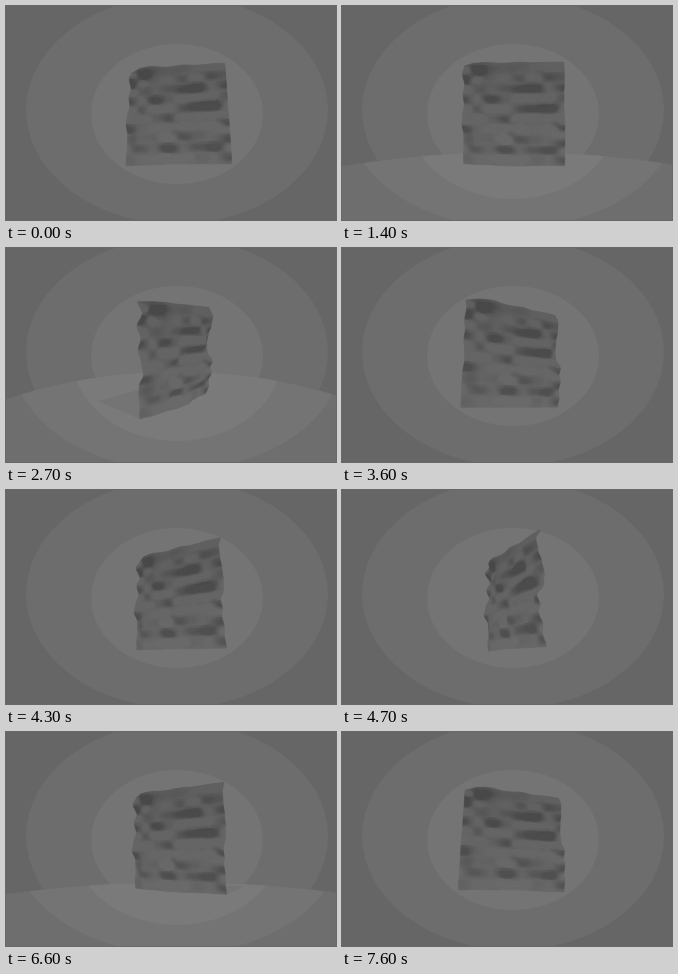
These frames come from a looping animation (330 px wide and 214 px high, 9.9 s). An HTML page with a canvas:

```html
<!DOCTYPE html>
<html lang="en">
<head>
<meta charset="utf-8">
<title>Rippled sheet</title>
<style>
  html, body { margin: 0; width: 100%; height: 100%; overflow: hidden; background: #666; }
  canvas { display: block; width: 100vw; height: 100vh; }
</style>
</head>
<body>
<canvas id="stage" width="330" height="214"></canvas>
<script>
const ctx = document.getElementById('stage').getContext('2d');
const W = 330, H = 214, CX = 171, CY = 108;
const LOOP = 9900, STEPS = 37;
const DIST = 2.35, FOCAL = 235;
const FLOOR_Y = -0.62, FLOOR_R = 2.2, FLOOR_MIN_TILT = -9;
const CELLS = 56, COLS = 7, ROWS = 10;

// the camera swings through these poses
const POSES = [
  { t: 0, yaw: 11, tilt: -18 },
  { t: 1400, yaw: 7, tilt: -3 },
  { t: 2700, yaw: -48, tilt: 8 },
  { t: 3600, yaw: -24, tilt: -12 },
  { t: 4700, yaw: 58, tilt: -15 },
  { t: 5700, yaw: 62, tilt: 6 },
  { t: 7600, yaw: -11, tilt: -18 }
];

const grey = level => {
  const g = Math.round(level);
  return `rgb(${g},${g},${g})`;
};
const clamp = (x, low, high) => Math.max(low, Math.min(high, x));
const smooth = x => x * x * (3 - 2 * x);
const mix = (a, b, p) => a + (b - a) * p;
const bell = (x, y) => Math.exp(-x * x - y * y);

function random(i, j) {
  const n = Math.sin(i * 127.1 + j * 311.7) * 43758.5453;
  return n - Math.floor(n);
}

function noise(x, y) {
  const i = Math.floor(x), j = Math.floor(y);
  const p = smooth(x - i), q = smooth(y - j);
  return mix(mix(random(i, j), random(i + 1, j), p),
             mix(random(i, j + 1), random(i + 1, j + 1), p), q);
}

// random ripples, a raised top left corner and a bulge on the right edge
function sheetHeight(u, v) {
  return .09 * noise(u * COLS, v * ROWS)
    + .07 * bell((u - .16) / .14, v / .08)
    + .06 * bell((u - 1) / .1, (v - .73) / .07);
}

function shade(u, v) {
  const d = .008;
  const hx = (sheetHeight(u + d, v) - sheetHeight(u - d, v)) / (2 * d);
  const hy = (sheetHeight(u, v - d) - sheetHeight(u, v + d)) / (2 * d);
  const light = (.78 - .1 * hx - .6 * hy) / Math.hypot(hx, hy, 1);
  return 60 + 56 * clamp(light, .38, .83) - 10 * (1 - v);
}

const vertices = [], faces = [];
for (let j = 0; j <= CELLS; j++)
  for (let i = 0; i <= CELLS; i++) {
    const u = i / CELLS, v = j / CELLS;
    vertices.push([u - .5, .5 - v, sheetHeight(u, v)]);
    if (i < CELLS && j < CELLS) {
      const a = j * (CELLS + 1) + i;
      faces.push({
        corners: [a, a + 1, a + CELLS + 2, a + CELLS + 1],
        color: grey(shade((i + .5) / CELLS, (j + .5) / CELLS))
      });
    }
  }

function poseAt(t) {
  const last = POSES[POSES.length - 1];
  if (t < POSES[1].t) return POSES[0];
  if (t >= last.t) return last;
  const i = POSES.findIndex(pose => pose.t > t);
  const a = POSES[i - 1], b = POSES[i];
  const p = smooth((t - a.t) / (b.t - a.t));
  return { yaw: mix(a.yaw, b.yaw, p), tilt: mix(a.tilt, b.tilt, p) };
}

function camera(yaw, tilt) {
  const [c, s, ct, st] = [yaw, tilt].flatMap(degrees => {
    const angle = degrees * Math.PI / 180;
    return [Math.cos(angle), Math.sin(angle)];
  });
  return ([x, y, z]) => {
    const depth = x * s + z * c;
    const near = y * st + depth * ct;
    const scale = FOCAL / (DIST - near);
    return [CX + (x * c - z * s) * scale, CY - (y * ct - depth * st) * scale, near];
  };
}

function trace(points) {
  ctx.beginPath();
  points.forEach(([x, y]) => ctx.lineTo(x, y));
  ctx.closePath();
}

function ellipse(y, rx, ry, level) {
  ctx.fillStyle = grey(level);
  ctx.beginPath();
  ctx.ellipse(CX, y, rx, ry, 0, 0, Math.PI * 2);
  ctx.fill();
}

function drawRoom() {
  ctx.fillStyle = grey(102);
  ctx.fillRect(0, 0, W, H);
  ellipse(104, 151, 114, 109);
  ellipse(CY, 86, 70, 116);
}

function drawFloor({ yaw, tilt }) {
  if (tilt < FLOOR_MIN_TILT) return;
  const view = camera(0, tilt), rim = [];
  for (let a = 0; a < 180; a++) {
    const angle = a * Math.PI / 90;
    rim.push(view([FLOOR_R * Math.sin(angle), FLOOR_Y, FLOOR_R * Math.cos(angle)]));
  }
  ctx.save();
  trace(rim);
  ctx.clip();
  ctx.fillStyle = grey(110);
  ctx.fillRect(0, 0, W, H);
  ellipse(CY, 165, 114, 116);
  ellipse(CY, 105, 85, 122);
  const shadow = [[-.5, 0], [.5, 0], [.5, -.7], [-.5, -.7]];
  trace(shadow.map(([x, z]) => camera(yaw, tilt)([x, -.5, z])));
  ctx.fillStyle = 'rgba(0,0,0,.05)';
  ctx.fill();
  ctx.restore();
}

function drawSheet({ yaw, tilt }) {
  const points = vertices.map(camera(yaw, tilt));
  const depth = face => points[face.corners[0]][2] + points[face.corners[2]][2];
  ctx.lineWidth = .6;
  for (const face of [...faces].sort((a, b) => depth(a) - depth(b))) {
    trace(face.corners.map(n => points[n]));
    ctx.fillStyle = ctx.strokeStyle = face.color;
    ctx.fill();
    ctx.stroke();
  }
}

// the picture advances in coarse, slightly uneven steps
function steppedTime(t) {
  let time = 0;
  for (let k = 0; k < STEPS; k++) {
    const start = Math.floor((1406 + 173.5 * k) / 100) * 100;
    if (start <= t) time = start;
  }
  return time;
}

const origin = performance.now();
let shown = -1;
function tick() {
  const t = steppedTime((performance.now() - origin) % LOOP);
  if (t !== shown) {
    shown = t;
    const pose = poseAt(t);
    drawRoom();
    drawFloor(pose);
    drawSheet(pose);
  }
  requestAnimationFrame(tick);
}
tick();
</script>
</body>
</html>
```
